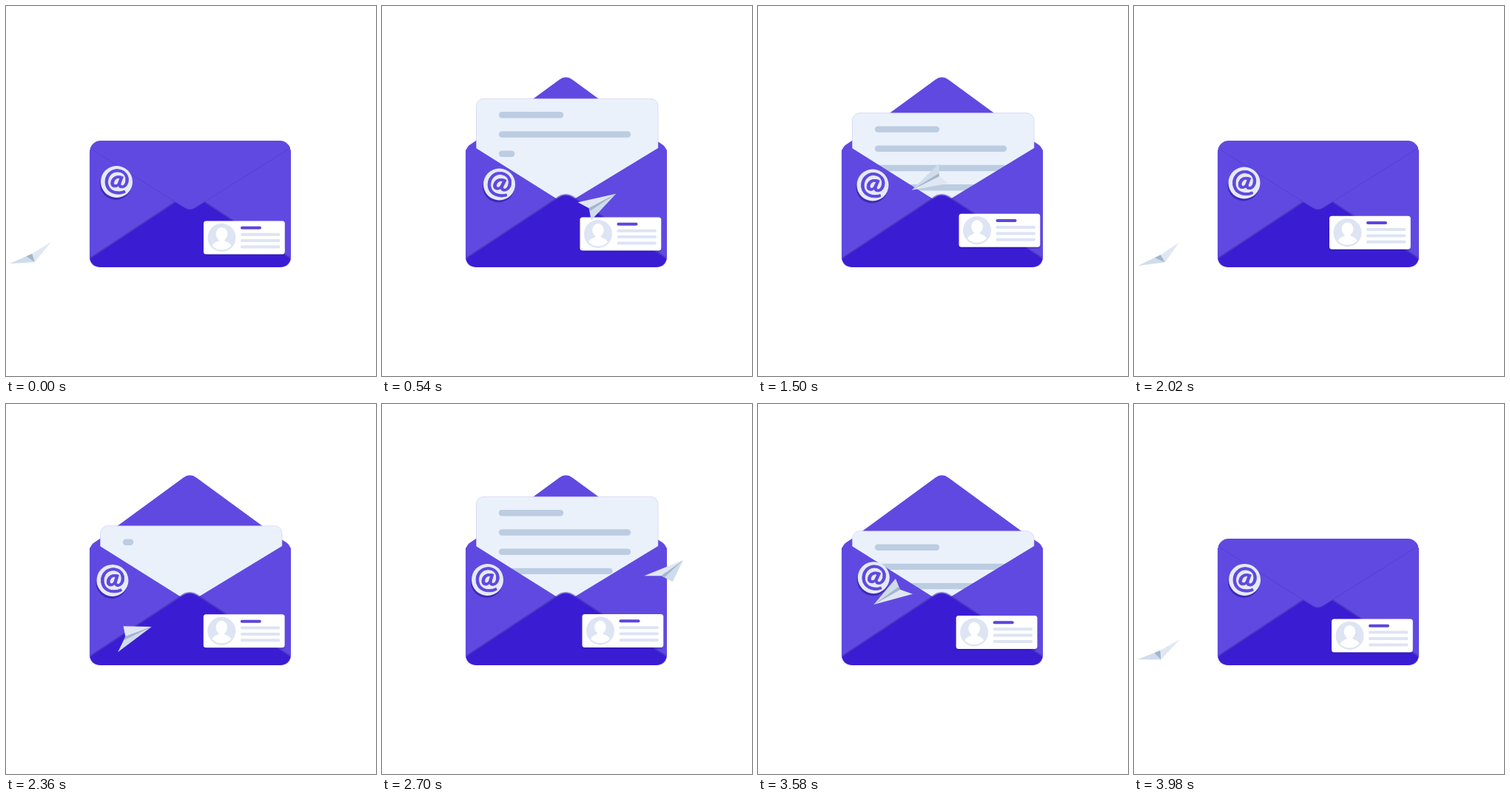
An HTML page that plays this animation: 500 by 500 pixels, repeating every 4000 ms.

```html
<!DOCTYPE html>
<html lang="en">
<head>
<meta charset="utf-8">
<title>Envelope</title>
<style>
  html, body { margin: 0; width: 100%; height: 100%; overflow: hidden; background: #fff; }
  svg { display: block; width: 100%; height: 100%; }
</style>
</head>
<body>
<svg viewBox="0 0 500 500">
  <defs>
    <clipPath id="body"><rect x="113" y="182" width="272" height="171" rx="15"/></clipPath>
  </defs>

  <path id="flapBack" fill="#6049e1"/>
  <path d="M113 200 Q113 192 118 188 L127 182 H371 L380 188 Q385 192 385 200 V338 Q385 353 370 353 H128 Q113 353 113 338Z" fill="#6049e1"/>

  <g id="letter">
    <rect x="127.5" width="245.5" height="138" rx="10" fill="#eaf1fb" stroke="#c9c6f3" stroke-width=".6"/>
    <g id="lines" stroke="#bccde2" stroke-width="8.4" stroke-linecap="round"></g>
  </g>

  <g clip-path="url(#body)">
    <path d="M113 194 L127 192 L248 268 L113 353Z M385 194 L373 192 L248 268 L385 353Z" fill="#6049e1"/>
    <path d="M113 340 L234 260 Q248 248 263 260 L385 340Z" fill="#432fae" opacity=".6"/>
    <path d="M113 342 L235 261.500 Q248 250 262 261.500 L385 342 V353 H113Z" fill="#3a1dd3"/>
    <path id="flapFront" fill="#6049e1" stroke="#533ccb" stroke-width=".8"/>
  </g>

  <g id="stamp">
    <circle cx="-1" cy="3" r="21.500" fill="#4129b8"/>
    <circle r="21.500" fill="#e4ebf6"/>
    <text id="at" y="11.500" text-anchor="middle" font-family="Lato, 'Open Sans', sans-serif"
      font-weight="700" font-size="41" fill="#5f48df" stroke="#5f48df" stroke-width=".8">@</text>
  </g>

  <g id="card">
    <rect x="-.5" y="2.500" width="110.500" height="44.500" rx="4" fill="#25128d" opacity=".28"/>
    <rect width="109.800" height="45" rx="3.500" fill="#fff"/>
    <circle cx="24.500" cy="22.500" r="19" fill="#dde4f3"/>
    <ellipse cx="24.500" cy="17.500" rx="7.800" ry="9" fill="#fff"/>
    <path d="M20.500 23 H28.500 V27 Q36 29 37.500 33.500 Q32 39 24.500 39 Q17 39 11.500 33.500 Q13 29 20.500 27Z" fill="#fff"/>
    <g stroke-width="4" stroke-linecap="round">
      <path d="M52 9.300 H76" stroke="#5c46dd"/>
      <path d="M52 18.200 H101.500 M52 26.600 H101.500 M52 35 H101.500" stroke="#dde4f3"/>
    </g>
  </g>

  <g>
    <path id="rightWing" fill="#cfdcec"/>
    <path id="leftWing" fill="#e0e7f2"/>
    <path id="keel" fill="#a3b6cb"/>
  </g>
</svg>

<script>
const $ = id => document.getElementById(id);
const LOOP = 4000, CYCLE = 2000, STEP = 20;
const { sin, cos, PI } = Math;
const rad = degrees => degrees * PI / 180;

// A few points that each floating badge drifts through: time, x, y.
const cardDrift = [
  [0, 267, 290.5], [540, 267.5, 285.5], [1500, 271.5, 280.8],
  [2020, 264, 283.8], [2700, 270.5, 284], [3160, 268.7, 281]
];
const stampDrift = [
  [0, 149.5, 237.5], [540, 158.5, 241], [1500, 155, 242],
  [2020, 149, 239], [2700, 142.5, 237.5], [3160, 161.5, 233]
];

const lerp = (a, b, p) => a + (b - a) * p;
const progress = (t, from, to) => Math.min(1, Math.max(0, (t - from) / (to - from)));
const ease = p => p < .5 ? 2 * p * p : 1 - 2 * (1 - p) * (1 - p);

// Smooth closed curve through timed points.
function drift(points, time) {
  const n = points.length;
  const point = i => points[(i + n) % n];
  const when = i => point(i)[0] + Math.floor(i / n) * LOOP;
  let i = n - 1;
  while (points[i][0] > time) i--;
  const span = when(i + 1) - when(i), p = (time - when(i)) / span;
  const slope = (j, c) => (point(j + 1)[c] - point(j - 1)[c]) / (when(j + 1) - when(j - 1)) * span;
  return [1, 2].map(c => lerp(point(i)[c], point(i + 1)[c], p * p * (3 - 2 * p))
    + p * (1 - p) * ((1 - p) * slope(i, c) - p * slope(i + 1, c)));
}

const lines = Array.from({ length: 5 }, (_, i) => {
  const line = document.createElementNS('http://www.w3.org/2000/svg', 'path');
  $('lines').append(line);
  return { line, y: 22 + 26.2 * i, width: i ? 170 : 79, start: 353 + 90 * i };
});

function drawFlap(open) {
  const x = lerp(113, 127, open), base = lerp(192, 182, open);
  const tip = lerp(277, 93, open), round = lerp(.05, .075, open);
  const near = lerp(tip, base, round), inset = (248.5 - x) * round;
  const edge = `M${x} ${base} L${248.5 - inset} ${near} Q248.5 ${tip} ${248.5 + inset} ${near} L${497 - x} ${base}`;
  const folded = tip > base;
  $('flapFront').setAttribute('d', folded ? edge + 'L388 180 H110Z' : '');
  $('flapBack').setAttribute('d', folded ? '' : edge + 'Z');
}

function drawLetter(t) {
  const up = ease(progress(t, 240, 500)) - ease(progress(t, 1365, 1725));
  $('letter').setAttribute('transform', `translate(0 ${lerp(194, 125.3, up)})`);
  for (const { line, y, width, start } of lines) {
    const p = progress(t, start, start + 90);
    line.setAttribute('d', p ? `M162 ${y} h${width * p}` : '');
  }
}

// The plane circles on a tilted disc, which the view flattens along one diagonal.
function drawPlane(t) {
  const turn = 2 * PI * t / CYCLE, tilt = rad(-28);
  const project = (along, across) => [
    along * cos(tilt) - across * sin(tilt),
    along * sin(tilt) + across * cos(tilt)
  ];
  const [px, py] = project(-227 * cos(turn), 19 + 39 * sin(turn - rad(48)));
  const tail = rad(271 - 12 * sin(2 * turn)) - turn;
  const size = 1.03 - .13 * cos(2 * turn);
  const wing = angle => project(55 * size * cos(angle), 20 * size * sin(angle));
  const left = wing(tail + rad(40)), right = wing(tail - rad(40));
  const nose = [240 + px, 240 + py].map((v, i) => v - (left[i] + right[i]) / 3);
  // Point at the given shares of the two wing vectors, seen from the nose.
  const at = (l, r) => nose.map((v, i) => v + l * left[i] + r * right[i]).join(' ');
  const triangle = (id, a, b) => $(id).setAttribute('d', `M${nose.join(' ')} L${a} L${b}Z`);
  triangle('leftWing', at(1, 0), at(.45, .4));
  triangle('rightWing', at(0, 1), at(.45, .4));
  triangle('keel', at(.45, .4), at(.33, .55));
}

function render(time) {
  const t = time % CYCLE;
  drawFlap(ease(progress(t, 40, 300)) - ease(progress(t, 1650, 1960)));
  drawLetter(t);
  drawPlane(t);
  $('card').setAttribute('transform', `translate(${drift(cardDrift, time)})`);
  const [x, y] = drift(stampDrift, time);
  $('stamp').setAttribute('transform', `translate(${x} ${y})`);
  $('at').setAttribute('transform', `rotate(${(x - 139) * .6})`);
}

const begin = performance.now();
function tick() {
  const time = (performance.now() - begin) % LOOP;
  render(Math.floor(time / STEP) * STEP);
  requestAnimationFrame(tick);
}
tick();
</script>
</body>
</html>
```
